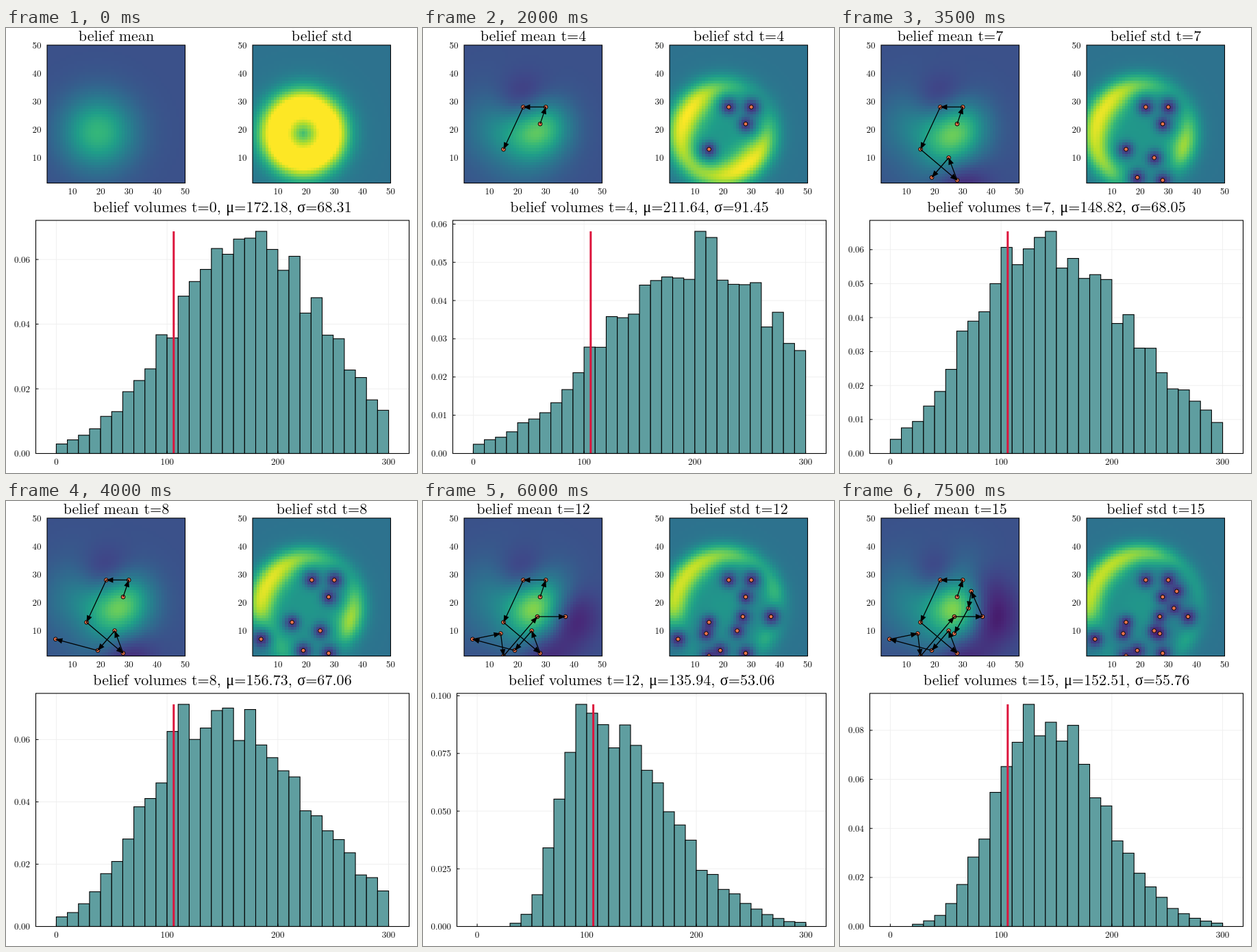
An HTML page with a canvas that plays this animation: 600x650 px, repeating every 8 s.

```html
<!DOCTYPE html>
<html lang="en">
<head>
<meta charset="utf-8">
<title>Belief over time</title>
<style>
  html, body { margin: 0; width: 100%; height: 100%; overflow: hidden; background: #fff; }
  #stage { position: relative; width: 600px; height: 650px; overflow: hidden; }
  .map { position: absolute; top: 25px; width: 201.5px; height: 201.5px; overflow: hidden; }
  .map canvas { position: absolute; left: -2.06px; top: -2.06px; width: 205.6px; height: 205.6px; image-rendering: pixelated; }
  #chart { position: absolute; left: 0; top: 0; }
  text { font-family: "Latin Modern Roman", "Liberation Serif", "Noto Serif", serif; font-size: 13px; fill: #000; }
  .title { font-size: 22.1px; text-anchor: middle; }
  .mid { text-anchor: middle; }
  .end { text-anchor: end; }
  .bar { fill: #5f9ea0; stroke: #000; stroke-width: 1.1; }
  .box { fill: none; stroke: #000; stroke-width: 1.1; }
  .tick { stroke: #000; stroke-width: 1; }
  .grid { stroke: #efefef; stroke-width: 1; }
  .truth { stroke: #dc143c; stroke-width: 3; }
  .arrow { stroke: #000; stroke-width: 1.3; }
  .dot { fill: #e9724c; stroke: #000; stroke-width: 1; }
</style>
</head>
<body>
<div id="stage">
  <div class="map" style="left:60px"><canvas id="mean" width="50" height="50"></canvas></div>
  <div class="map" style="left:360px"><canvas id="std" width="50" height="50"></canvas></div>
  <svg id="chart" width="600" height="650" viewBox="0 0 600 650"></svg>
</div>
<script>
const STEP = 500, STEPS = 16, N = 50, BINS = 30;
const CELL = 201.5 / 49, MAP_TOP = 25, MAP_SIZE = 201.5, MAPS = [60, 360];
const FLOOR = 621.5, CEIL = 281, PEAK = 324.5, RIGHT = 588.5, TRUTH = 106;
const REACH = 7, NOISE = .05;
const VIRIDIS = ['440154', '482878', '3e4989', '31688e', '26828e', '1f9e89', '35b779', '6ece58', 'b5de2b', 'fde725']
  .map(h => [0, 2, 4].map(i => parseInt(h.substr(i, 2), 16)));

// Measurements in order: x, y, value
const VISITS = [[28, 22, .72], [30, 28, .45], [22, 28, .33], [15, 13, .48], [28, 2, .15],
  [25, 10, .55], [19, 3, .32], [4, 7, .3], [14, 9, .42], [15, 1, .27],
  [27, 15, .76], [37, 15, .2], [33, 24, .42], [32, 18, .62], [27, 9, .5]];

// Volume distribution: step, μ, σ, mode, left spread, right spread, tallest bar
const VOLUMES = [
  [0, 172.18, 68.31, 175, 70, 70, .0687],
  [2, 231.03, 83.19, 238, 85, 57, .0654],
  [4, 211.64, 91.45, 205, 82, 75, .0581],
  [7, 148.82, 68.05, 125, 52, 88, .0654],
  [10, 172.56, 65.07, 158, 55, 78, .0831],
  [12, 135.94, 53.06, 96, 21, 70, .0963],
  [15, 152.51, 55.76, 128, 34, 58, .0906]];

const lerp = (a, b, k) => a + (b - a) * k;
const bell = u => Math.exp(-u * u / 2);
const dist = (p, x, y) => Math.hypot(x - p[0], y - p[1]);

function random(seed) {
  return () => (seed = seed * 16807 % 2147483647) / 2147483647;
}

// Gaussian elimination for a small symmetric system
function solve(A, b) {
  const n = b.length, M = A.map((row, i) => [...row, b[i]]);
  for (let i = 0; i < n; i++) {
    for (let r = i + 1; r < n; r++) {
      const f = M[r][i] / M[i][i];
      for (let c = i; c <= n; c++) M[r][c] -= f * M[i][c];
    }
  }
  const w = [];
  for (let i = n - 1; i >= 0; i--) {
    w[i] = M[i][n];
    for (let c = i + 1; c < n; c++) w[i] -= M[i][c] * w[c];
    w[i] /= M[i][i];
  }
  return w;
}

// Gaussian process: a round prior bent through the measurements
function meanField(pts, grow) {
  const prior = (x, y) => .25 + .41 * bell(dist([19, 19], x, y) / (9 + 2 * grow));
  const K = pts.map((p, i) => pts.map((q, j) => bell(dist(p, q[0], q[1]) / REACH) + (i === j ? NOISE : 0)));
  const weights = solve(K, pts.map(([x, y, v]) => v - prior(x, y)));
  return (x, y) => pts.reduce((s, p, i) => s + weights[i] * bell(dist(p, x, y) / REACH), prior(x, y));
}

// Fraction of uncertainty left after the measurements nearby
const unknown = (pts, x, y, depth, reach) =>
  pts.reduce((f, p) => f * (1 - depth * bell(dist(p, x, y) / reach)), 1);

// Uncertainty is a ring that widens and thins, erased around each measurement
function stdField(pts, grow) {
  const radius = 10 + 8 * grow, height = .65 - .15 * grow;
  const inner = 6 - 2 * grow, outer = 4.6 - 1.5 * grow;
  return (x, y) => {
    const r = dist([19 + grow, 18.7], x, y), d = r - radius;
    const ring = height * bell(d / (d < 0 ? inner : outer)) * unknown(pts, x, y, 1, 5);
    return Math.min(1, .375 + .15 * bell(r / 11) + ring) * unknown(pts, x, y, .72, 1.9);
  };
}

function shade(v) {
  const u = Math.max(0, Math.min(.9999, v)) * (VIRIDIS.length - 1), i = Math.floor(u);
  return VIRIDIS[i].map((c, j) => lerp(c, VIRIDIS[i + 1][j], u - i));
}

function paint(id, value) {
  const ctx = document.getElementById(id).getContext('2d');
  const img = ctx.createImageData(N, N);
  for (let row = 0; row < N; row++) {
    for (let col = 0; col < N; col++) {
      img.data.set([...shade(value(col + 1, N - row)), 255], (row * N + col) * 4);
    }
  }
  ctx.putImageData(img, 0, 0);
}

const line = (cls, x1, y1, x2, y2) => `<line class="${cls}" x1="${x1}" y1="${y1}" x2="${x2}" y2="${y2}"/>`;
const label = (cls, x, y, s) => `<text class="${cls}" x="${x}" y="${y}">${s}</text>`;
const rect = (cls, x, y, w, h) => `<rect class="${cls}" x="${x}" y="${y}" width="${w}" height="${h}"/>`;
const mapX = v => (v - 1) * CELL;
const mapY = v => (N - v) * CELL;

function arrow(from, to) {
  const [x1, y1, x2, y2] = [mapX(from[0]), mapY(from[1]), mapX(to[0]), mapY(to[1])];
  const turn = Math.atan2(y2 - y1, x2 - x1) * 180 / Math.PI;
  return line('arrow', x1, y1, x2, y2) +
    `<path d="M0 0L-10 -4V4Z" transform="translate(${x2} ${y2}) rotate(${turn})"/>`;
}

function mapOverlay(left, name, t, pts, arrows) {
  let s = label('title', left + 101, 18.5, name + (t ? ' t=' + t : ''));
  for (let v = 10; v <= 50; v += 10) {
    s += label('mid', left + mapX(v), 242.5, v) + label('end', left - 8.5, MAP_TOP + mapY(v) + 4.5, v);
  }
  s += `<svg x="${left}" y="${MAP_TOP}" width="${MAP_SIZE}" height="${MAP_SIZE}">`;
  s += pts.map(([x, y]) => `<circle class="dot" cx="${mapX(x)}" cy="${mapY(y)}" r="2.9"/>`).join('');
  if (arrows) s += pts.slice(1).map((p, i) => arrow(pts[i], p)).join('');
  return s + '</svg>' + rect('box', left, MAP_TOP, MAP_SIZE, MAP_SIZE);
}

// Two-sided bell with sampling jitter, tallest bar = 1
function sampleBars(t, mode, left, right) {
  const rand = random(4243 * (t + 1));
  const bars = Array.from({ length: BINS }, (_, i) => {
    const d = i * 10 + 5 - mode;
    const h = bell(d / (d < 0 ? left : right)) * lerp(.87, 1.13, rand());
    return h < .01 ? 0 : h;
  });
  const top = Math.max(...bars);
  return bars.map(b => b / top);
}

function histogram(t, [mu, sigma, mode, spreadL, spreadR, top]) {
  const scale = PEAK / top;
  const step = top < .067 ? .01 : top < .092 ? .02 : .025;
  const digits = step === .025 ? 3 : 2;
  const left = digits === 3 ? 49.5 : 43.5;
  const unit = (RIGHT - left) / 337, zero = left + 18.5 * unit;
  const px = v => zero + v * unit;
  let grid = '', ticks = '';
  for (let v = 0; v <= 300; v += 100) {
    grid += line('grid', px(v), CEIL, px(v), FLOOR);
    ticks += line('tick', px(v), FLOOR, px(v), FLOOR - 4) + label('mid', px(v), 637.5, v);
  }
  for (let i = 0; FLOOR - i * step * scale > CEIL; i++) {
    const y = FLOOR - i * step * scale;
    grid += line('grid', left, y, RIGHT, y);
    ticks += line('tick', left, y, left + 4, y) + label('end', left - 8.5, y + 4.5, (i * step).toFixed(digits));
  }
  const columns = sampleBars(t, mode, spreadL, spreadR)
    .map((b, i) => b && rect('bar', px(i * 10), FLOOR - b * PEAK, 10 * unit, b * PEAK))
    .filter(Boolean).join('');
  return label('title', (left + RIGHT) / 2, 269, `belief volumes t=${t}, μ=${mu.toFixed(2)}, σ=${sigma.toFixed(2)}`) +
    grid + columns + line('truth', px(TRUTH), FLOOR, px(TRUTH), FLOOR - PEAK) +
    rect('box', left, CEIL, RIGHT - left, FLOOR - CEIL) + ticks;
}

function volumesAt(t) {
  const i = Math.max(1, VOLUMES.findIndex(v => v[0] >= t));
  const a = VOLUMES[i - 1], b = VOLUMES[i];
  const k = (t - a[0]) / (b[0] - a[0]);
  return a.map((v, j) => lerp(v, b[j], k)).slice(1);
}

function draw(t) {
  const pts = VISITS.slice(0, t), grow = Math.sqrt(t / (STEPS - 1));
  paint('mean', meanField(pts, grow));
  paint('std', stdField(pts, grow));
  document.getElementById('chart').innerHTML =
    mapOverlay(MAPS[0], 'belief mean', t, pts, true) +
    mapOverlay(MAPS[1], 'belief std', t, pts, false) +
    histogram(t, volumesAt(t));
}

const start = performance.now();
let shown = -1;
function tick() {
  const t = Math.floor((performance.now() - start) / STEP) % STEPS;
  if (t !== shown) draw(shown = t);
  requestAnimationFrame(tick);
}
tick();
</script>
</body>
</html>
```
